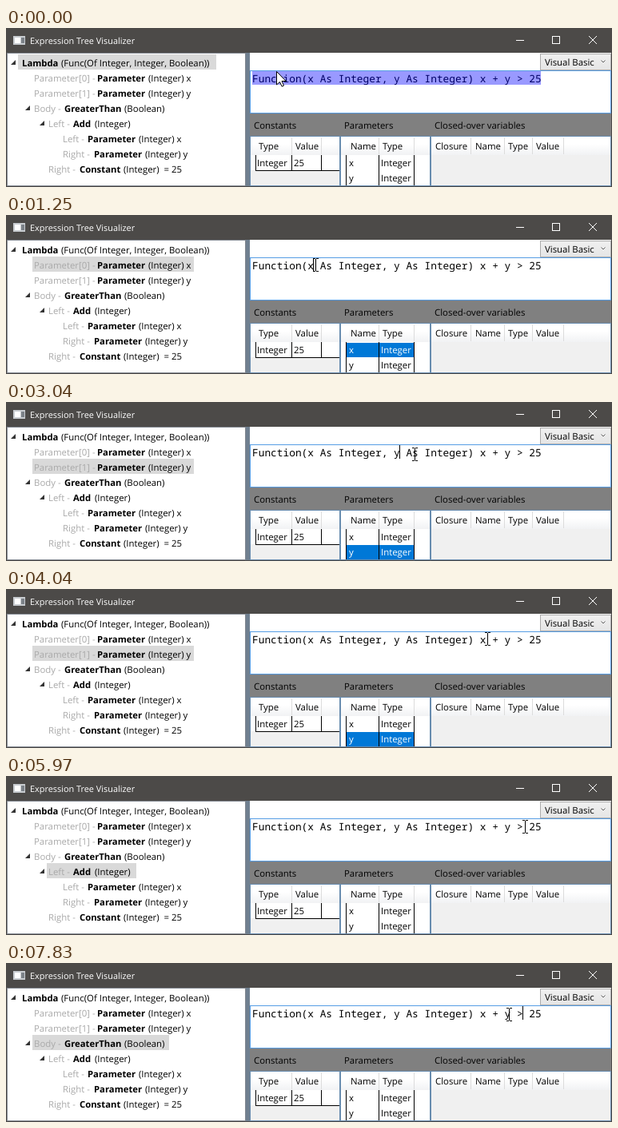
These frames come from a looping animation (758x199 px, 8 s). An HTML page with a canvas:

```html
<!DOCTYPE html>
<html lang="en">
<head>
<meta charset="utf-8">
<title>Expression Tree Visualizer</title>
<style>
  html, body { margin: 0; width: 100%; height: 100%; overflow: hidden; background: #fff; }
  canvas { display: block; }
</style>
</head>
<body>
<canvas id="stage" width="758" height="199"></canvas>
<script>
const ctx = document.getElementById('stage').getContext('2d');
const LOOP = 8000;
const UI = '11.4px "Open Sans", sans-serif';
const BOLD = 'bold 11.3px "Open Sans", sans-serif';
const TITLE = '10.9px "Open Sans", sans-serif';
const CODE = '12.83px "Noto Sans Mono", monospace';
const CHROME = '#4c4a48', GRID_BORDER = '#688caf', HIGHLIGHT = '#0078d7', FOCUS = '#569de5';
const CODE_X = 308, CHAR_W = 7.698;

// text x, grey prefix, bold name x, name, rest x, rest, highlight left, highlight right, expander x
const tree = [
  [20, '', 20, 'Lambda', 69, '(Func(Of Integer, Integer, Boolean))', 15, 263, 6],
  [35, 'Parameter[0] -', 114, 'Parameter', 178, '(Integer) x', 33, 235],
  [35, 'Parameter[1] -', 114, 'Parameter', 178, '(Integer) y', 33, 235],
  [35, 'Body -', 73, 'GreaterThan', 148, '(Boolean)', 33, 204, 24],
  [53, 'Left -', 84, 'Add', 111, '(Integer)', 51, 163, 42],
  [71, 'Left -', 102, 'Parameter', 166, '(Integer) x'],
  [71, 'Right -', 110, 'Parameter', 174, '(Integer) y'],
  [53, 'Right -', 92, 'Constant', 147, '(Integer)  = 25']
];

// Each click selects a tree row and a grid row and puts the caret after a character.
const clicks = [
  { at: 0, until: 0, row: 0 },
  { at: 1170, until: 1250, row: 1, param: 0, column: 10, x: 386, y: 61 },
  { at: 2490, until: 2640, row: 2, param: 1, column: 24, x: 494, y: 65 },
  { at: 5040, until: 5190, row: 4, column: 39, x: 611, y: 61 },
  { at: 6590, until: 6740, row: 3, column: 44, x: 643, y: 63 }
];
const caretToggles = [1170, 1780, 2340, 3100, 3580, 4040, 4650, 5580, 6120, 7140, 7670];

// Pointer moves: first step, last step, number of steps, end x, end y
const moves = [
  [240, 620, 6, 384, 66],
  [790, 940, 3, 384, 62],
  [1170, 1170, 1, 387, 62],
  [1710, 2090, 6, 496, 67],
  [3040, 3040, 1, 511, 65],
  [3115, 3810, 10, 602, 62],
  [4140, 4190, 2, 600, 62],
  [4340, 4500, 3, 618, 62],
  [4650, 4730, 2, 613, 62],
  [5510, 5660, 3, 652, 62],
  [5890, 6130, 4, 645, 64],
  [7370, 7830, 7, 629, 64]
];

function rect(x, y, w, h, color) {
  ctx.fillStyle = color;
  ctx.fillRect(x, y, w, h);
}

function frame(x, y, w, h, color) {
  ctx.strokeStyle = color;
  ctx.lineWidth = 1;
  ctx.strokeRect(x + .5, y + .5, w - 1, h - 1);
}

function text(str, x, y, font = UI, color = '#000') {
  ctx.font = font;
  ctx.fillStyle = color;
  ctx.fillText(str, x, y);
}

function line(color, ...points) {
  ctx.strokeStyle = color;
  ctx.lineWidth = 1;
  ctx.beginPath();
  points.forEach(([x, y]) => ctx.lineTo(x, y));
  ctx.stroke();
}

function polygon(points, color) {
  ctx.fillStyle = color;
  ctx.beginPath();
  points.forEach(([x, y]) => ctx.lineTo(x, y));
  ctx.closePath();
  ctx.fill();
}

function shade(top, bottom, from, to, start = 0) {
  const grad = ctx.createLinearGradient(0, top, 0, bottom);
  grad.addColorStop(start, from);
  grad.addColorStop(1, to);
  return grad;
}

function pointerAt(t) {
  let x = 338, y = 54;
  for (const [start, end, steps, toX, toY] of moves) {
    if (t < start) break;
    const gap = steps > 1 ? (end - start) / (steps - 1) : 1;
    const part = Math.min(steps, Math.floor((t - start) / gap + 1e-6) + 1) / steps;
    x += (toX - x) * part;
    y += (toY - y) * part;
  }
  return [Math.round(x), Math.round(y)];
}

function drawTitleBar() {
  rect(0, 0, 758, 31, CHROME);
  rect(9, 10, 15, 11, '#c8ccd0');
  rect(11, 12, 7, 7, '#fff');
  rect(19, 12, 4, 7, '#7c8288');
  text('Expression Tree Visualizer', 30, 20, TITLE, '#fff');
  rect(638, 15, 10, 1, '#fff');
  frame(683, 10, 10, 10, '#fff');
  line('#fff', [729, 10], [739, 20]);
  line('#fff', [739, 10], [729, 20]);
}

function drawTree(selected) {
  tree.forEach(([x, prefix, nameX, name, restX, rest, left, right, arrow], i) => {
    const top = Math.round(33.4 + i * 18.96), base = Math.round(48 + i * 18.96);
    if (i === selected) rect(left, top, right - left, 19, '#d9d9d9');
    if (arrow) polygon([[arrow + 6, base - 8], [arrow + 6, base - 2], [arrow, base - 2]], '#333');
    text(prefix, x, base, UI, '#a9a9a9');
    text(name, nameX, base, BOLD);
    text(rest, restX, base);
  });
  frame(1, 31, 299, 167, '#828790');
  rect(300, 31, 5, 167, '#708090');
}

function drawEditor(selected) {
  rect(668, 32, 89, 21, shade(32, 53, '#f0f0f0', '#e5e5e5'));
  frame(668, 32, 89, 21, '#acacac');
  text('Visual Basic', 674, 47);
  line('#606060', [744.5, 40.5], [747, 43], [749.5, 40.5]);

  frame(305, 53, 452, 54, FOCUS);
  text('Function(x As Integer, y As Integer) x + y > 25', CODE_X, 67.5, CODE);
  if (selected) rect(CODE_X, 54, 361, 17, 'rgba(0,0,255,.4)');
}

// columns: [label, text x, right edge]
function drawGrid(title, left, right, columns, rows = [], selected = -1) {
  const inner = right - left - 2;
  rect(left, 107, right - left, 28, '#808080');
  text(title, left + 5, 126);
  rect(left, 135, right - left, 63, '#f0f0f0');
  rect(left + 1, 136, inner, 23, shade(136, 159, '#fff', '#f1f2f4', .4));
  for (const [label, x, edge] of columns) {
    text(label, x, 152);
    rect(edge, 137, 1, 21, '#dcdcdc');
  }
  const first = left + 8, last = columns[columns.length - 1][2];
  rows.forEach((cells, i) => {
    const top = 160 + i * 19;
    rect(left + 1, top - 1, inner, 19, '#fff');
    if (i === selected) rect(first, top, last - first, 18, HIGHLIGHT);
    rect(first - 1, top + 18, right - first, 1, '#000');
    rect(first - 1, top - 1, 1, 19, '#000');
    columns.forEach(([, x, edge], c) => {
      rect(edge, top - 1, 1, 19, '#000');
      text(cells[c], x - 2, top + 13, UI, i === selected ? '#fff' : '#000');
    });
  });
  frame(left, 135, right - left, 63, GRID_BORDER);
}

function drawArrow(x, y) {
  const shape = [[0, 0], [0, 16.5], [4, 13], [6.6, 18.7], [9, 17.6], [6.5, 12], [11.7, 12]];
  const at = shape.map(([dx, dy]) => [x + dx + .5, y + dy + .5]);
  polygon(at, '#fff');
  line('#000', ...at, at[0]);
}

function drawBeam(x, y) {
  rect(x, y - 7, 1, 15, '#000');
  for (const edge of [y - 8, y + 8]) {
    rect(x - 3, edge, 3, 1, '#000');
    rect(x + 1, edge, 3, 1, '#000');
  }
}

function drawClick(x, y) {
  ctx.fillStyle = 'rgba(252,245,0,.65)';
  ctx.beginPath();
  ctx.arc(x, y, 12, 0, Math.PI * 2);
  ctx.fill();
}

function draw(t) {
  const click = clicks.filter(c => c.at <= t).pop();
  const caretOn = caretToggles.filter(at => at <= t).length % 2 === 1;
  const [x, y] = pointerAt(t);

  rect(0, 0, 758, 199, '#fff');
  drawTitleBar();
  drawTree(click.row);
  drawEditor(click.row === 0);
  drawGrid('Constants', 305, 418, [['Type', 316, 357], ['Value', 362, 394]], [['Integer', '25']]);
  drawGrid('Parameters', 418, 531, [['Name', 431, 466], ['Type', 471, 510]],
    [['x', 'Integer'], ['y', 'Integer']], click.param);
  drawGrid('Closed-over variables', 531, 757,
    [['Closure', 537, 581], ['Name', 587, 623], ['Type', 628, 658], ['Value', 663, 697]]);
  frame(0, 0, 758, 199, CHROME);

  if (caretOn) rect(Math.floor(CODE_X + click.column * CHAR_W - .5), 54, 1, 17, '#000');
  if (t < 1170) drawArrow(x, y);
  else drawBeam(x, y);
  if (t < click.until) drawClick(click.x, click.y);
}

ctx.textRendering = 'geometricPrecision';
const begin = performance.now();
function tick() {
  draw((performance.now() - begin) % LOOP);
  requestAnimationFrame(tick);
}
tick();
</script>
</body>
</html>
```
